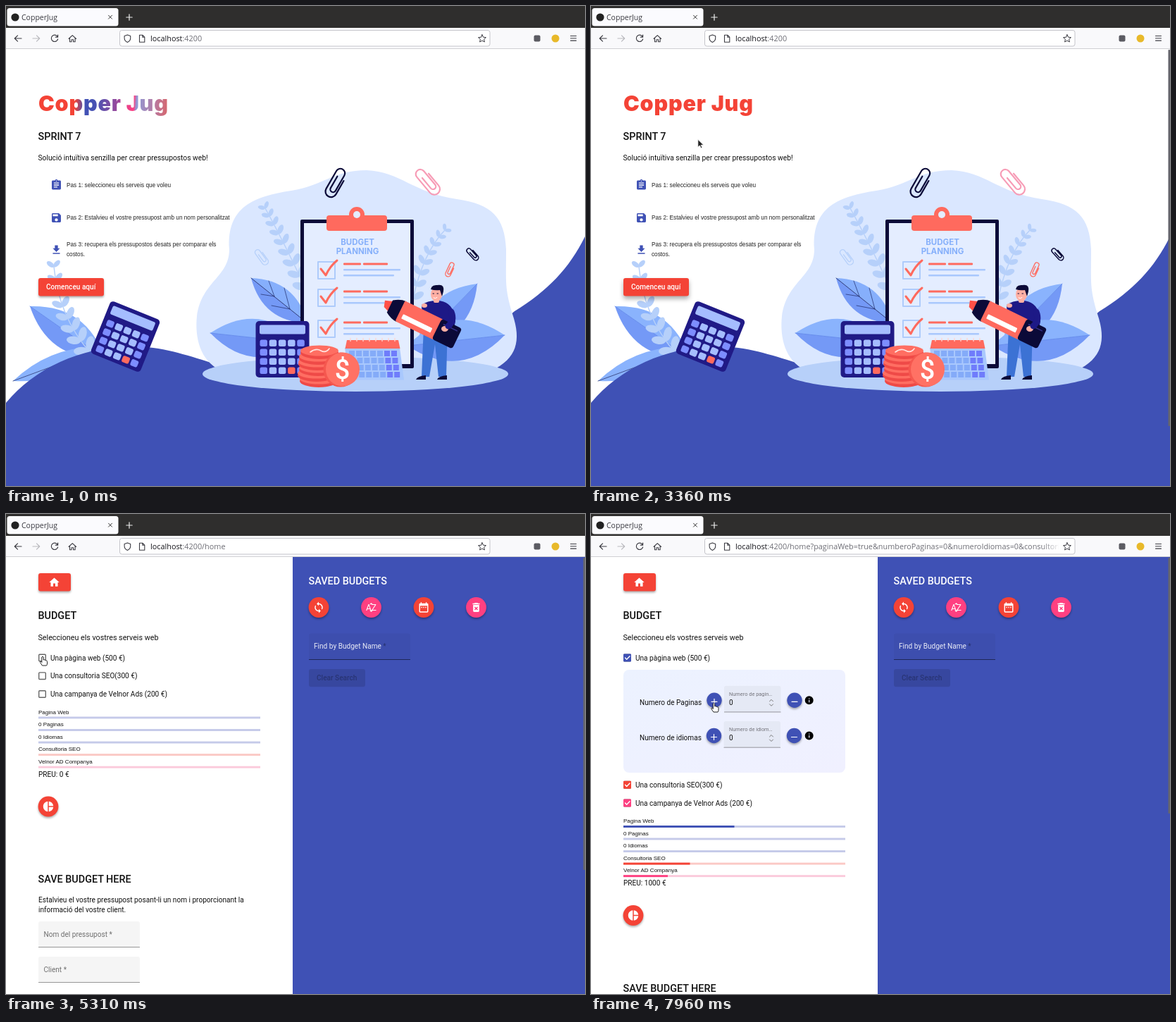
Animation, 822 px wide and 681 px high, one loop 8000 ms. Source, as an HTML page with a canvas:

```html
<!DOCTYPE html>
<html lang="ca">
<head>
<meta charset="utf-8">
<title>CopperJug</title>
<style>
html, body { margin: 0; width: 100%; height: 100%; overflow: hidden; background: #fff; }
#stage { position: absolute; left: 0; top: 0; width: 822px; height: 681px; overflow: hidden; }
#stage > * { position: absolute; left: 0; top: 0; }
svg { font-family: Roboto, sans-serif; display: block; }
.ui { font-family: "Open Sans", sans-serif; }
.small { font-family: "Liberation Sans", Arial, sans-serif; }
.up { filter: drop-shadow(0 2px 1.5px rgba(0,0,0,.32)); }
#stage > #panel { left: 46px; top: 221px; width: 315px; height: 146px; overflow: visible; }
</style>
</head>
<body>
<div id="stage">
  <canvas id="art" width="822" height="681"></canvas>
  <svg id="base" width="822" height="681"></svg>
  <svg id="panel" viewBox="46 221 315 146"></svg>
  <svg id="top" width="822" height="681"></svg>
</div>
<script>
const LOOP = 8000;
const BLUE = '#3f51b5', RED = '#f44336', PINK = '#ff4081', NAVY = '#0b0a38', CORAL = '#ff6a5e';
const $ = id => document.getElementById(id);

// ---------- markup helpers ----------
const rect = (x, y, w, h, fill, r = 0, more = '') =>
  `<rect x="${x}" y="${y}" width="${w}" height="${h}" rx="${r}" fill="${fill}" ${more}/>`;
const circ = (x, y, r, fill, more = '') => `<circle cx="${x}" cy="${y}" r="${r}" fill="${fill}" ${more}/>`;
const txt = (x, y, s, size, fill = '#111', more = '') =>
  `<text x="${x}" y="${y}" font-size="${size}" fill="${fill}" ${more}>${s}</text>`;
const line = (d, color, w = 1.2, more = '') =>
  `<path d="${d}" fill="none" stroke="${color}" stroke-width="${w}" stroke-linecap="round" stroke-linejoin="round" ${more}/>`;
const group = (id, body, more = '') => `<g id="${id}" ${more}>${body}</g>`;

const ICONS = {
  list: 'M19 3h-4.18C14.4 1.84 13.3 1 12 1c-1.3 0-2.4.84-2.82 2H5c-1.1 0-2 .9-2 2v14c0 1.1.9 2 2 2h14c1.1 0 2-.9 2-2V5c0-1.1-.9-2-2-2zm-7 0c.55 0 1 .45 1 1s-.45 1-1 1-1-.45-1-1 .45-1 1-1zm2 14H7v-2h7v2zm3-4H7v-2h10v2zm0-4H7V7h10v2z',
  save: 'M17 3H5a2 2 0 0 0-2 2v14a2 2 0 0 0 2 2h14a2 2 0 0 0 2-2V7l-4-4zm-5 16a3 3 0 1 1 0-6 3 3 0 0 1 0 6zm3-10H5V5h10v4z',
  load: 'M19 9h-4V3H9v6H5l7 7 7-7zM5 18v2h14v-2H5z',
  home: 'M10 20v-6h4v6h5v-8h3L12 3 2 12h3v8z',
  loop: 'M12 4V1L8 5l4 4V6c3.31 0 6 2.69 6 6 0 1.01-.25 1.97-.7 2.8l1.46 1.46C19.54 15.03 20 13.57 20 12c0-4.42-3.58-8-8-8zm0 14c-3.31 0-6-2.69-6-6 0-1.01.25-1.97.7-2.8L5.24 7.74C4.46 8.97 4 10.43 4 12c0 4.42 3.58 8 8 8v3l4-4-4-4v3z',
  date: 'M19 4h-1V2h-2v2H8V2H6v2H5a2 2 0 0 0-2 2v14a2 2 0 0 0 2 2h14a2 2 0 0 0 2-2V6a2 2 0 0 0-2-2zm0 16H5V9h14v11zM7 11h2v2H7zm4 0h2v2h-2zm4 0h2v2h-2z',
  trash: 'M6 19c0 1.1.9 2 2 2h8c1.1 0 2-.9 2-2V7H6v12zm2.46-7.12l1.41-1.41L12 12.59l2.12-2.12 1.41 1.41L13.41 14l2.12 2.12-1.41 1.41L12 15.41l-2.12 2.12-1.41-1.41L10.59 14l-2.13-2.12zM15.5 4l-1-1h-5l-1 1H5v2h14V4z',
  pie: 'M11 2v20c-5.07-.5-9-4.79-9-10s3.93-9.5 9-10zm2.03 0v8.99H22c-.47-4.74-4.24-8.52-8.97-8.99zm0 11.01V22c4.74-.47 8.5-4.25 8.97-8.99h-8.97z',
  info: 'M12 2a10 10 0 1 0 0 20 10 10 0 0 0 0-20zm1 15h-2v-6h2v6zm0-8h-2V7h2v2z'
};
const icon = (name, x, y, color, k = .72) =>
  `<path transform="translate(${x - 12 * k} ${y - 12 * k}) scale(${k})" d="${ICONS[name]}" fill="${color}"/>`;
const fab = (x, y, color, name) => circ(x, y, 14.4, color, 'class="up"') + (name ? icon(name, x, y, '#fff') : '');

// ---------- browser frame ----------
function chrome() {
  const ink = '#3b3b42';
  return rect(0, 0, 822, 31, '#2f2e2d') + rect(1.5, 3, 158, 25.5, '#fbfbfe', 3.5) +
    group('fav', circ(13, 16, 5.6, '#222')) + rect(8, 14.5, 3, 3, '#777', 1.5, 'id="spin"') +
    txt(22, 19.8, '', 10.5, '#3a3a40', 'id="tab" class="ui"') +
    line('M145.5 13.2l5 5M150.5 13.2l-5 5', '#333', 1) + line('M175 11.8v8.4M170.8 16h8.4', '#eee', 1.2) +
    rect(0, 31, 822, 29, '#f9f9fb') + rect(0, 60, 822, 1, '#cfcfd3') +
    rect(161.5, 34.5, 525.5, 22.5, '#fff', 3, 'stroke="#c4c4ca"') +
    line('M22 46H12.5M16.5 41.8L12.3 46l4.2 4.2', ink) +
    line('M38 46h9.5M43.5 41.8l4.2 4.2-4.2 4.2', '#b9b9be') +
    group('reload', line('M73 43.2A4.7 4.7 0 1 0 73.6 47M73.6 41v3.2h-3.2', ink)) +
    group('stop', line('M65 42.5l7.4 7.4M72.4 42.5L65 49.900', ink)) +
    line('M89 46.5l5.3-4.9 5.3 4.9M90.5 45.500v5.300h2.500v-3h2.600v3h2.500v-5.300', ink, 1.1) +
    line('M172.400 40.900l4.300 1.500v3q0 4.100-4.300 6-4.300-1.900-4.300-6v-3z', ink, 1.1) +
    line('M189.500 41.200h4.300l3 3v7h-7.300zM193.800 41.200v3h3', ink, 1.1) +
    `<clipPath id="urlClip"><rect x="200" y="36" width="464" height="20"/></clipPath>` +
    `<linearGradient id="fade"><stop offset="0" stop-color="#fff" stop-opacity="0"/><stop offset="1" stop-color="#fff"/></linearGradient>` +
    `<text x="205" y="49.800" font-size="10.85" class="ui" clip-path="url(#urlClip)"><tspan fill="#15141a">localhost</tspan><tspan id="url" fill="#6c6c74"></tspan></text>` +
    rect(640, 37, 26, 18, 'url(#fade)') +
    line('M676 40.700l1.600 3.500 3.800.4-2.800 2.600.8 3.800-3.400-1.900-3.400 1.900.8-3.800-2.800-2.600 3.800-.4z', ink, 1) +
    rect(749.5, 41.5, 9, 9, '#5b5b62', 2) + circ(780, 46, 5.5, '#e8b92a', 'id="addon"') +
    line('M801.500 42.500h8M801.500 45.800h8M801.500 49.100h8', ink, 1.1);
}

// ---------- first page ----------
function landing() {
  const stops = [[0, RED], [.27, RED], [.34, BLUE], [.43, '#4a52b2'], [.6, '#a0489a'], [.66, '#e8418a'],
    [.71, PINK], [.73, '#8f9ad6'], [.86, '#b57aa4'], [1, '#e2605a']];
  const step = (y, name) => icon(name, 71.5, y, BLUE);
  const small = (y, s) => txt(86, y, s, 8.22, '#222', 'class="small"');
  return `<linearGradient id="mix" gradientUnits="userSpaceOnUse" x1="47" y1="133" x2="236" y2="146">` +
    stops.map(([o, c]) => `<stop offset="${o}" stop-color="${c}"/>`).join('') + '</linearGradient>' +
    txt(46, 149, 'Copper Jug', 30.5, 'url(#mix)', 'id="title" font-weight="900" letter-spacing=".8" style="font-family:Inter,sans-serif"') +
    txt(45.5, 190, 'SPRINT 7', 14.4, '#111', 'font-weight="500"') +
    txt(45.5, 218.5, 'Solució intuïtiva senzilla per crear pressupostos web!', 10.25) +
    step(254, 'list') + step(300.5, 'save') + step(346, 'load') +
    small(256.8, 'Pas 1: seleccioneu els serveis que voleu') +
    small(302.8, 'Pas 2: Estalvieu el vostre pressupost amb un nom personalitzat') +
    small(341, 'Pas 3: recupera els pressupostos desats per comparar els') + small(355.3, 'costos.') +
    rect(46, 386, 93, 25.5, RED, 3, 'id="start" class="up"') +
    '<clipPath id="btnClip"><rect x="46" y="386" width="93" height="25.5" rx="3"/></clipPath>' +
    `<g clip-path="url(#btnClip)">${circ(116, 399, 0, '#fff', 'id="wave" opacity=".12"')}</g>` +
    txt(57, 402, 'Comenceu aquí', 10.08, '#fff', 'font-weight="500"');
}

// ---------- second page ----------
const BARS = [['Pagina Web', BLUE, '#c5cae9'], ['0 Paginas', BLUE, '#c5cae9'], ['0 Idiomas', BLUE, '#c5cae9'],
  ['Consultoria SEO', RED, '#fbc9c5'], ['Velnor AD Companya', PINK, '#fbcadb']];

const check = (n, y, color, label) => circ(51.5, y, 14.4, color, `id="rip${n}" opacity="0"`) +
  rect(46.7, y - 4.800, 9.600, 9.600, '#fff', 1, 'stroke="#666" stroke-width="1.4"') +
  group('chk' + n, rect(46, y - 5.500, 11, 11, color, 1) + line(`M48.500 ${y}l2.200 2.300 4.300-4.500`, '#fff', 1.400)) +
  txt(63, y + 3.600, label, 10.08);

const field = (x, y, w, label) => rect(x, y, w, 36.500, '#f5f5f5', 3) +
  rect(x, y + 36, w, .9, '#8d8d8d') + txt(x + 7.5, y + 21.500, label, 10.08, '#6f6f6f');

function home() {
  const para = (y, s) => txt(46, y, s, 10.08);
  const bars = BARS.map(([label, color, pale], i) => {
    const y = 283.500 + i * 17.550;
    return txt(46, y, label, 8.030, '#111', 'class="small"') + rect(46, y + 4, 315, 2.900, pale) +
      rect(46, y + 4, 0, 2.900, color, 0, `id="bar${i}"`);
  }).join('');
  const lower = check(2, 229.700, RED, 'Una consultoria SEO(300 €)') +
    check(3, 255.500, PINK, 'Una campanya de Velnor Ads (200 €)') + bars +
    txt(46, 372.600, '', 10.080, '#111', 'id="price"') + fab(60, 415, RED, 'pie') +
    txt(45.500, 523, 'SAVE BUDGET HERE', 14.4, '#111', 'font-weight="500"') +
    para(551, 'Estalvieu el vostre pressupost posant-li un nom i proporcionant la') +
    para(565, 'informació del vostre client.') + field(46, 578, 144, 'Nom del pressupost *') + field(46, 628, 144, 'Client *');
  return rect(46, 84, 46, 25.500, RED, 3, 'class="up"') + icon('home', 68.500, 97, '#fff') +
    txt(45.500, 149, 'BUDGET', 14.4, '#111', 'font-weight="500"') +
    txt(45.500, 179, 'Seleccioneu els vostres serveis web', 10.720) +
    check(1, 204, BLUE, 'Una pàgina web (500 €)') + group('lower', lower) +
    rect(407, 61, 415, 620, BLUE) + txt(429.500, 100, 'SAVED BUDGETS', 14.4, '#fff', 'font-weight="500"') +
    fab(444, 132.500, RED, 'loop') + fab(518.500, 132.500, PINK) +
    txt(518.500, 137, 'AZ', 12, '#fff', 'text-anchor="middle"') +
    `<path d="M515 127l3.500-3.300 3.500 3.300zM515 139l3.500 3.300 3.500-3.300z" fill="#fff" transform="translate(518.5 132.5) scale(.7) translate(-518.5 -133)"/>` +
    fab(593, 132.500, RED, 'date') + fab(667.500, 132.500, PINK, 'trash') +
    rect(430, 169.500, 144, 37, 'rgba(0,0,0,.04)', 3) + rect(430, 206, 144, 1, 'rgba(0,0,0,.5)') +
    txt(437, 191, 'Find by Budget Name <tspan fill="#27326f">*</tspan>', 10.080, '#e8eaf6') +
    rect(430, 220, 80, 25.300, 'rgba(0,0,0,.12)', 3) +
    txt(441, 236, 'Clear Search', 10.080, 'rgba(0,0,0,.27)', 'font-weight="500"');
}

function panel() {
  const row = (y, dx, name, label) => txt(69, y + 6.500, name, 10.080) +
    circ(175 + dx, y, 10.700, BLUE, 'class="up"') + line(`M${171 + dx} ${y + 2}h8m-4-4v8`, '#fff', 1.200) +
    rect(189 + dx, y - 20.500, 80.500, 37, '#e5e9f5', 3) + rect(189 + dx, y + 16.200, 80.500, .9, '#8a8a90') +
    txt(196, y - 6.500, label, 7.400, '#74747c') + txt(196, y + 6.300, '0', 10.080) +
    line(`M${253.500} ${y + 1.500}l2.500-2.500 2.500 2.500M253.500 ${y + 5.500}l2.500 2.500 2.500-2.500`, '#777', 1) +
    circ(289 + dx, y, 10.700, BLUE, 'class="up"') + line(`M${285 + dx} ${y + 2}h8`, '#fff', 1.200) +
    icon('info', 309.700, y, '#000', .6);
  return '<linearGradient id="tint" x2="1" y2="1"><stop offset="0" stop-color="#ecf2ff"/><stop offset="1" stop-color="#f0f0ff"/></linearGradient>' +
    rect(46, 221, 315, 146, 'url(#tint)', 8) + row(264.300, 0, 'Numero de Paginas', 'Numero de pagin…') +
    row(314.500, -.5, 'Numero de idiomas', 'Numero de idiom…');
}

$('base').innerHTML = group('landing', landing()) + group('home', home()) + chrome() +
  rect(819.500, 62, 2.500, 10, '#65656c', 1, 'id="scroll"');
$('panel').innerHTML = panel();
$('top').innerHTML = group('status', '<path id="tip" fill="#f9f9fb" stroke="#c8c8cc"/>' +
  txt(2.500, 677.500, '', 10.350, '#333', 'id="tipText" class="ui"')) +
  group('arrow', '<path d="M0 0V11L2.600 8.600 4.300 12.500 6.100 11.700 4.400 8H8z" fill="#222" stroke="#fff" stroke-width=".8"/>') +
  group('hand', '<path d="M-1.200 1Q0-1 1.200 1V5L2 4.600Q3 4.400 3.200 5.300 4.600 4.800 5 6 6.500 5.800 6.500 7.500V10Q6.500 12 5.500 13H-.5Q-2 11-3.500 8.500-3.800 7-2.500 7.200L-1.200 8.500z" fill="#fff" stroke="#222" stroke-width="1"/>');

// ---------- illustration ----------
const c = $('art').getContext('2d');
const fill = (color, d) => { c.fillStyle = color; c.fill(new Path2D(d)); };
const stroke = (color, w, d) => { c.strokeStyle = color; c.lineWidth = w; c.stroke(new Path2D(d)); };
const box = (color, x, y, w, h, r = 0) => { c.fillStyle = color; c.beginPath(); c.roundRect(x, y, w, h, r); c.fill(); };
const oval = (color, x, y, rx, ry = rx, a = 0) => { c.fillStyle = color; c.beginPath(); c.ellipse(x, y, rx, ry, a, 0, 7); c.fill(); };
function at(x, y, deg, scale, draw) {
  c.save(); c.translate(x, y); c.rotate(deg * Math.PI / 180); c.scale(scale, scale); draw(); c.restore();
}
function leaf(x0, y0, x1, y1, w, upper, lower, vein = '#5f86ea') {
  const len = Math.hypot(x1 - x0, y1 - y0);
  at(x0, y0, Math.atan2(y1 - y0, x1 - x0) * 180 / Math.PI, 1, () => {
    fill(upper, `M0 0Q${len * .5} ${-w * 2} ${len} 0z`);
    fill(lower, `M0 0Q${len * .5} ${w * 2} ${len} 0z`);
    stroke(vein, .8, `M0 0H${len}`);
  });
}
function sprig(x0, y0, cx, cy, x1, y1, n, size) {
  const color = '#b6d0fa';
  stroke(color, 1.500, `M${x0} ${y0}Q${cx} ${cy} ${x1} ${y1}`);
  for (let i = 0; i <= n; i++) {
    const t = i / n, u = 1 - t, s = size * (.55 + .45 * t);
    const x = u * u * x0 + 2 * u * t * cx + t * t * x1, y = u * u * y0 + 2 * u * t * cy + t * t * y1;
    const a = Math.atan2(u * (cy - y0) + t * (y1 - cy), u * (cx - x0) + t * (x1 - cx)) + Math.PI;
    for (const side of [-.85, .85]) {
      const b = a + side;
      oval(color, x + Math.cos(b) * s, y + Math.sin(b) * s, s, s * .55, b);
    }
  }
}
function calculator() {
  box('#201a86', -38, -40, 76, 80, 5);
  box('#a5bdff', -32.500, -34.500, 65, 13, 2.500);
  for (let r = 0; r < 4; r++) for (let k = 0; k < 5; k++)
    box(r === 3 && k === 3 ? CORAL : k === 0 || k === 4 ? '#7d8dff' : '#a5bdff', -32 + k * 13.200, -13.500 + r * 13, 10.500, 9.500, 2.500);
}
const clip = (x, y, deg, s, color, w) => at(x, y, deg, s, () =>
  stroke(color, w / s, 'M-3 -9V10A4 4 0 0 0 5 10V-15A6.500 6.500 0 0 0 -8 -15V14A7.500 7.500 0 0 0 8 14V-8'));

function art() {
  c.lineCap = c.lineJoin = 'round';
  leaf(34, 426, 140, 500, 24, '#8ab3fd', '#7499f6');
  leaf(10, 532, 140, 484, 15, '#8ab3fd', '#8ab3fd', '#32417f');
  sprig(68, 370, 75, 440, 118, 490, 7, 11);
  fill(BLUE, 'M0 563C40 515 105 483 180 483C260 483 320 530 420 530C560 530 640 500 722 433C768 405 800 372 822 327V681H0z');
  fill('#dae7ff', 'M317 345C313 285 352 270 405 262C450 255 465 233 512 233C560 235 578 265 640 274C690 281 708 300 710 345C710 395 708 400 719 437C732 475 725 500 690 517Q500 540 305 517C275 503 268 470 271 440C278 390 317 385 317 345z');
  oval('#b7d0f9', 496, 522, 217, 25);
  sprig(368, 287, 392, 330, 425, 400, 8, 9.500);
  sprig(623, 318, 592, 350, 578, 415, 7, 8.500);
  leaf(348, 386, 428, 450, 19, '#86affc', '#7499f6', '#1f2a66');
  stroke('#1f2a66', .7, 'M373 390L381 412M395 400L403 430M362 409L381 412M377 425L403 430');
  leaf(290, 464, 420, 478, 27, '#8ab3fd', '#7499f6');
  leaf(669, 394, 585, 480, 24, '#7499f6', '#8ab3fd');
  leaf(708, 467, 570, 482, 29, '#7499f6', '#8ab3fd');

  // clipboard
  box(NAVY, 418, 303, 161, 211, 2);
  box('#e4edff', 423, 308, 151, 200);
  oval(CORAL, 498, 296, 11);
  box(CORAL, 455, 297, 86, 22, 4);
  oval('#e4edff', 498, 296, 5);
  c.fillStyle = '#86b0fb'; c.textAlign = 'center'; c.font = '700 11.5px Inter, sans-serif';
  c.fillText('BUDGET', 499, 338.500); c.fillText('PLANNING', 499, 351.500);
  for (const y of [362, 401, 445]) {
    stroke('#aecbfb', 2, `M443 ${y + 1}h24v24h-24z`);
    stroke(CORAL, 3, `M447 ${y + 11}l7 9Q460 ${y + 7} 470 ${y - 1}`);
    box(CORAL, 479, y + 2.500, 25, 3, 1); box(CORAL, 507, y + 2.500, 35, 3, 1);
    box('#a9c8fd', 479, y + 11, 81, 2.500, 1); box('#a9c8fd', 479, y + 19, 72, 2.500, 1);
  }
  at(392.500, 487, 0, 1, calculator);
  at(169.500, 469, 22, 1, calculator);

  // calendar
  fill('#a9c8fd', 'M481 485H559L565 530.500H488z');
  for (let r = 0; r < 4; r++) for (let k = 0; k < 7; k++)
    box(k > 4 ? '#6f7cfb' : '#84abf8', 487 + k * 10 + r * 1.400, 489 + r * 10, 8, 8);
  fill(CORAL, 'M484 474H557L559.500 486H481.500z');
  for (let i = 0; i < 8; i++) stroke('#ffd5d0', 1.300, `M${489 + i * 9} 471.500v4`);

  // coins
  for (let i = 0; i < 6; i++) {
    const x = 443 + [1, -2, 0, -1, 0, 2][i], y = 532 - i * 8;
    oval('#ef4a47', x, y, 27, 9); oval('#ff6e62', x, y - 3, 27, 7.500);
  }
  stroke('#ffe5e2', 1.600, 'M432 491Q440 485 447 489T459 486');
  oval('#f5584f', 475, 516, 24.500); oval('#ff7164', 478, 515.500, 24);
  c.fillStyle = '#fff'; c.font = '500 38px Roboto, sans-serif'; c.fillText('$', 477.500, 529);

  // person with marker
  fill('#3c72d4', 'M593 455H627L625 526H614L609 480 601 526H590z');
  fill(NAVY, 'M582 530Q584 525 596 524V530zM612 530Q614 525 626 524V530z');
  fill('#1d1986', 'M590 424Q600 417 613 418 631 419 636 436 641 449 634 458L628 466H592z');
  oval('#ffafa3', 611, 409, 8, 10); box('#ffafa3', 607, 414, 8, 7, 2);
  fill(NAVY, 'M603 406Q602 395 612 396 623 394 621 405L619 412 616 403Q609 404 603 402z');
  stroke(NAVY, 1, 'M606 408h1.500M612 408h1.500'); stroke('#fff', 1, 'M607 414Q610 416 612 413.500');
  at(591, 448, 26, 1, () => {
    fill('#ff4f47', 'M-61 -4L-50 -8V8L-58 5z');
    fill(NAVY, 'M-51 -9Q-42 -16 -33 -16V16Q-42 16 -51 10z');
    box(CORAL, -35, -16, 60, 32, 2);
    box('#fff', -29, 2, 46, 7, 1);
    box(NAVY, 23, -16, 32, 32, 4);
    stroke('#34318a', 1.500, 'M29 -10H50');
  });
  oval('#ffafa3', 623, 458, 5, 4); oval('#ffafa3', 594, 425, 4, 3);
  stroke('#1d1986', 9, 'M632 434Q637 446 628 454');

  clip(468.500, 251, 30, 1, NAVY, 2.200);
  clip(599, 249, -40, 1, '#f79cb6', 2.200);
  clip(363, 356, -36, .58, '#b6d0fa', 1.300);
  clip(630.500, 374, 25, .48, CORAL, 1.300);
  clip(662.500, 352, -42, .48, NAVY, 1.500);
}
art();

// ---------- timeline ----------
const T = { open: 4180, swap: 4450, ready: 4880, web: 5730, seo: 6690, ads: 7340 };
const PATH = [[90, 800, 300], [830, 112, 420], [910, 112, 420], [1060, 109, 394], [1370, 109, 394], [1455, 106, 401],
  [2130, 106, 401], [2660, 150, 146], [2900, 168, 142], [3120, 160, 146], [3350, 152, 188], [3600, 117, 424],
  [3720, 116, 402], [4290, 116, 397], [4400, 116, 397], [4460, 114, 399], [4580, 114, 399], [5280, 52, 202],
  [5830, 52, 205], [6030, 55, 238], [6430, 52, 382], [7150, 52, 383], [7270, 51, 407], [7420, 51, 407], [7950, 174.500, 268]];
const HAND = [[985, 2200], [3660, 4450], [5210, 5900], [6380, 7500], [7880, LOOP]];

const clamp = v => Math.min(1, Math.max(0, v));
const smooth = v => v * v * (3 - 2 * v);
const easeIn = v => v ** 1.7;
const within = (t, a, b) => t >= a && t < b;
const show = (id, on) => { $(id).style.display = on ? '' : 'none'; };
const set = (id, name, v) => $(id).setAttribute(name, v);

function place(t) {
  let i = PATH.findIndex(p => p[0] > t);
  if (i < 0) return PATH[PATH.length - 1].slice(1);
  if (i === 0) return PATH[0].slice(1);
  const [t0, x0, y0] = PATH[i - 1], [t1, x1, y1] = PATH[i], k = smooth((t - t0) / (t1 - t0));
  return [x0 + (x1 - x0) * k, y0 + (y1 - y0) * k];
}
// Each change eases towards its new share of the total.
const share = (t, changes) => changes.reduce((v, [when, to]) => v + (to - v) * smooth(clamp((t - when) / 250)), 0);

function flip(t) {
  const p = clamp((t - T.web) / 1000), keys = [[0, 90], [.4, -20], [.6, 10], [.8, -5], [1, 0]];
  const i = Math.min(3, keys.findIndex(k => k[0] > p) < 0 ? 3 : keys.findIndex(k => k[0] > p) - 1);
  const [p0, a0] = keys[i], [p1, a1] = keys[i + 1], k = (p - p0) / (p1 - p0);
  $('panel').style.transform = `perspective(288px) rotateX(${a0 + (a1 - a0) * (i < 2 ? easeIn(k) : smooth(k))}deg)`;
  $('panel').style.opacity = easeIn(clamp(p / .6));
}

function render(t) {
  const second = t >= T.swap, open = t >= T.web;
  show('art', !second); show('landing', !second); show('home', second); show('panel', open);

  set('title', 'fill', within(t, 2600, 3430) ? RED : 'url(#mix)');
  const lift = smooth(clamp((t - 2000) / 280));
  $('start').style.filter = `drop-shadow(0 ${2 + lift * 2}px ${1.500 + lift * 1.500}px rgba(0,0,0,.33))`;
  const press = clamp((t - 4080) / 260);
  set('wave', 'r', t < 4080 ? 0 : 75 * press);

  const busy = within(t, T.open, T.ready);
  show('fav', !busy); show('spin', busy);
  set('spin', 'x', second ? 9 + 3 * Math.cos((t - 4460) / 130) : 7.800);
  set('spin', 'width', second ? 5.500 : 2.600);
  set('spin', 'height', second ? 2 : 2.600);
  set('spin', 'fill', second ? '#3d6fe0' : '#777');
  $('tab').textContent = within(t, T.open, T.swap) ? 'localhost:4200/home' : 'CopperJug';
  const loading = within(t, T.swap, T.ready);
  show('reload', !loading); show('stop', loading);
  set('addon', 'fill', busy ? '#55555c' : '#e8b92a');
  $('url').textContent = ':4200' + (t >= T.open ? '/home' : '') +
    (open ? '?paginaWeb=true&numberoPaginas=0&numeroIdiomas=0' : '') + (t >= T.seo ? '&consultoriaSEO=true' : '');

  const tip = within(t, 990, 2200) || within(t, 3680, T.open) ? 'localhost:4200/home'
    : within(t, T.open, T.swap) ? 'localhost' : loading ? 'Read localhost' : '';
  const w = t >= T.open ? 231 : 107;
  show('status', tip);
  $('tipText').textContent = tip;
  set('tip', 'd', `M-1 666H${w - 3}q3 0 3 3v13H-1z`);

  show('scroll', within(t, 90, 1950) || t >= 2150);
  set('scroll', 'height', !second ? 534 : open ? 363 : 443);

  set('lower', 'transform', `translate(0 ${open ? 154.500 : 0})`);
  [T.web, T.seo, T.ads].forEach((when, i) => {
    show('chk' + (i + 1), t >= when);
    const age = (t - when) / 420;
    set('rip' + (i + 1), 'opacity', age >= 0 && age < 1 ? .18 * (1 - age) : 0);
  });
  const parts = {
    bar0: [[T.web, 1], [T.seo, .625], [T.ads, .5]],
    bar3: [[T.seo, .375], [T.ads, .3]],
    bar4: [[T.ads, .2]]
  };
  for (const id in parts) set(id, 'width', 315 * share(t, parts[id]));
  $('price').textContent = `PREU: ${t >= T.ads ? 1000 : t >= T.seo ? 800 : open ? 500 : 0} €`;
  if (open) flip(t);

  const hand = HAND.some(([a, b]) => within(t, a, b)), pos = `translate(${place(t)})`;
  show('arrow', t >= 90 && !hand); show('hand', hand);
  set('arrow', 'transform', pos); set('hand', 'transform', pos);
}

const begin = performance.now();
function tick() {
  render((performance.now() - begin) % LOOP);
  requestAnimationFrame(tick);
}
tick();
</script>
</body>
</html>
```
